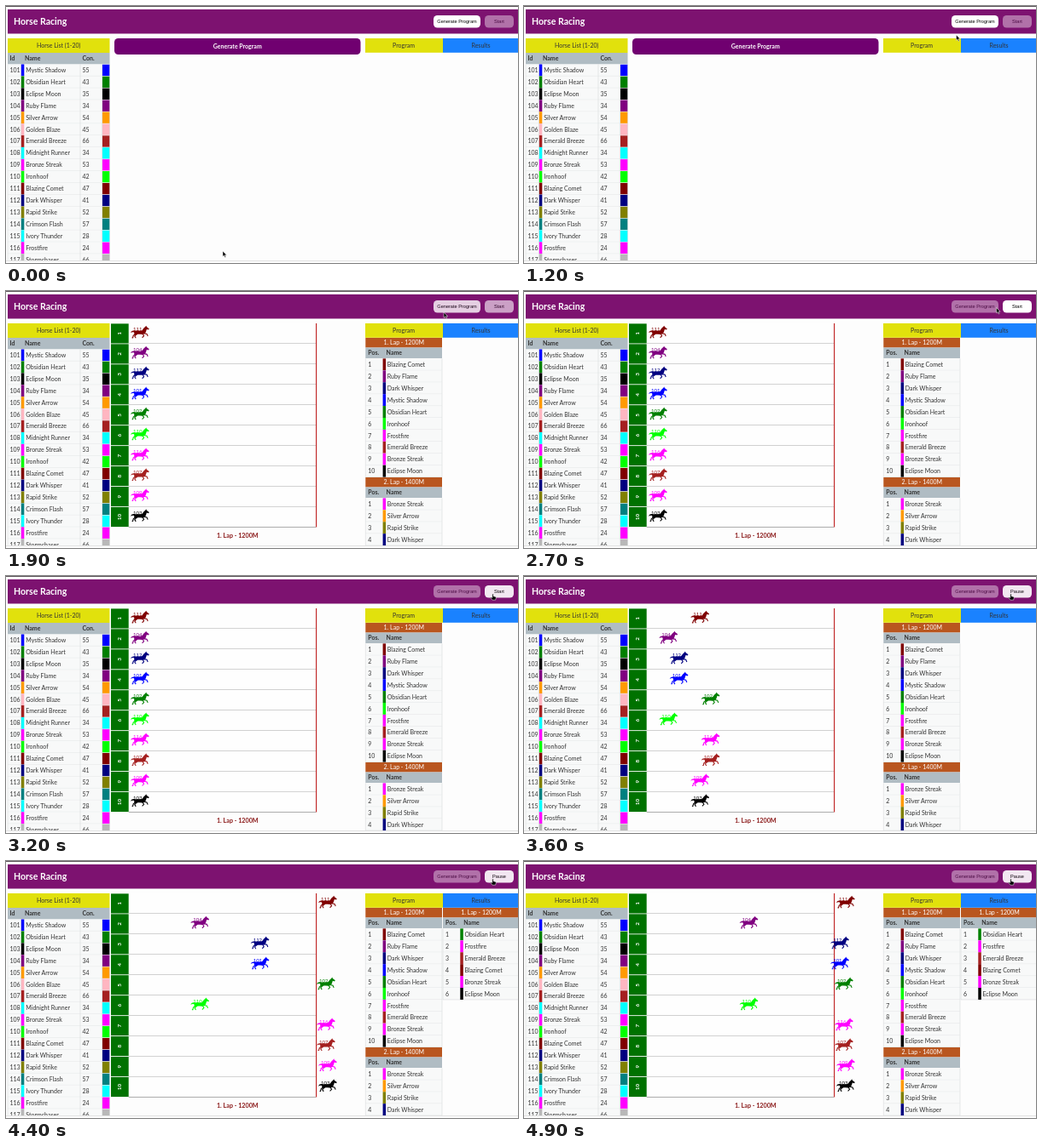
These frames come from a looping animation (600 px wide and 302 px high, 5000 ms). An HTML page:

```html
<!DOCTYPE html>
<html lang="en">
<head>
<meta charset="utf-8">
<title>Horse Racing</title>
<style>
  html, body { margin: 0; width: 100%; height: 100%; overflow: hidden; background: #fdfdfd; }
  svg { display: block; width: 100%; height: 100%; }
  text { font-family: Lato, "Open Sans", sans-serif; font-size: 7px; fill: #333; }
  .bold { font-weight: bold; }
  .mid { text-anchor: middle; }
  .white { fill: #fff; }
  .button text { font-family: "Liberation Sans", Arial, sans-serif; font-size: 5.6px; fill: #000; }
</style>
</head>
<body>
<svg id="stage" viewBox="0 0 600 302"></svg>
<script>
const LOOP = 5000, STEP = 100;
const PROGRAM_AT = 1800, PAUSE_AT = 3400, RACE_AT = 3430;
const ROW = 13.92, LANE = 23.95, TOP = 38;

const HORSES = [
  ['Mystic Shadow', 55, '#0000ff'], ['Obsidian Heart', 43, '#008000'],
  ['Eclipse Moon', 35, '#000000'], ['Ruby Flame', 34, '#800080'],
  ['Silver Arrow', 54, '#ff9a00'], ['Golden Blaze', 45, '#ffb6c1'],
  ['Emerald Breeze', 66, '#a52020'], ['Midnight Runner', 34, '#00ffff'],
  ['Bronze Streak', 53, '#ff00ff'], ['Ironhoof', 42, '#00ff00'],
  ['Blazing Comet', 47, '#800000'], ['Dark Whisper', 41, '#000080'],
  ['Rapid Strike', 52, '#808000'], ['Crimson Flash', 57, '#008080'],
  ['Ivory Thunder', 28, '#00ffff'], ['Frostfire', 24, '#ff00ff'],
  ['Stormchaser', 66, '#b8b8b8']
].map(([name, condition, color], i) => ({ id: 101 + i, name, condition, color }));
const horse = id => HORSES[id - 101];

const LAP_1 = [111, 104, 112, 101, 102, 110, 116, 107, 109, 103];
const LAP_2 = [109, 105, 113, 112];
const FINISHED = [102, 116, 107, 111, 109, 103];
const SPEEDS = [4, 1, 2, 2, 5, 1, 5, 5, 4, 4];
const UNIT = 0.0725; // px per ms
const finishDistance = speed => ({ 5: 218, 4: 220 })[speed] || 216;

// [time, x, y] of the pointer tip
const POINTER = [
  [0, 254, 288], [200, 373, 177], [400, 373, 177], [800, 463, 87], [900, 463, 87],
  [1200, 506.5, 34], [1400, 513, 25], [2100, 513, 25], [2700, 553.5, 19.5],
  [2900, 570.5, 21], [LOOP, 570.5, 21]
];

const rect = (x, y, w, h, fill, extra = '') =>
  `<rect x="${x}" y="${y}" width="${w}" height="${h}" fill="${fill}" ${extra}/>`;
const label = (x, y, str, cls = '', extra = '') =>
  `<text x="${x}" y="${y}" class="${cls}" ${extra}>${str}</text>`;
const line = (x1, y1, x2, y2, color, width = 0.6) =>
  `<path d="M${x1} ${y1}L${x2} ${y2}" stroke="${color}" stroke-width="${width}"/>`;

function button(id, x, w, str) {
  return `<g id="${id}" class="button">${rect(x, 11, w, 14.5, '#fff', 'rx="4.5"')}` +
    label(x + w / 2, 20.2, str, 'mid') + '</g>';
}

function horseList() {
  let out = rect(2, 38, 119.5, 17, '#e1e10c') + label(61.7, 48.6, 'Horse List (1-20)', 'mid') +
    rect(2, 55, 119.5, 13.5, '#b0bcc3') +
    label(4.5, 64.2, 'Id', 'bold') + label(22, 64.2, 'Name', 'bold') + label(89.5, 64.2, 'Con.', 'bold');
  HORSES.forEach((h, i) => {
    const y = 68.5 + i * ROW;
    out += rect(2, y, 119.5, ROW, '#f8f9f9') + line(2, y + ROW, 121.5, y + ROW, '#d5d8da') +
      rect(17.7, y, 3.6, ROW, h.color) + rect(113, y + 0.3, 8.5, ROW - 0.6, h.color) +
      label(4.5, y + 9.4, h.id) + label(23.3, y + 9.4, h.name) + label(89.5, y + 9.4, h.condition);
  });
  for (const x of [2, 17.5, 87, 112.5, 121.5]) out += line(x, 68.5, x, 300, '#d0d4d6', 0.5);
  return out;
}

function lapTable(x, y, title, ids) {
  let out = rect(x, y, 89.7, 11.5, '#b9561f') + label(x + 45, y + 8.2, title, 'mid white') +
    rect(x, y + 11.5, 89.7, 12.6, '#b0bcc3') +
    label(x + 3, y + 20.2, 'Pos.', 'bold') + label(x + 24.3, y + 20.2, 'Name', 'bold');
  ids.forEach((id, i) => {
    const h = horse(id), rowY = y + 24.4 + i * ROW;
    out += `<g class="row">${rect(x, rowY, 89.7, ROW, '#f8f9f9')}` +
      line(x, rowY + ROW, x + 89.7, rowY + ROW, '#d5d8da') +
      line(x, rowY, x, rowY + ROW, '#d0d4d6', 0.5) +
      line(x + 89.7, rowY, x + 89.7, rowY + ROW, '#d0d4d6', 0.5) +
      rect(x + 20.3, rowY, 3.5, ROW, h.color) +
      label(x + 3, rowY + 9.6, i + 1) + label(x + 25.5, rowY + 9.6, h.name) + '</g>';
  });
  return out;
}

function runner(id) {
  const { color } = horse(id);
  return `<g class="runner" fill="${color}" stroke="${color}">
    <path stroke="none" d="M0 8.4C1 5.8 3.4 5.4 5.4 6.2C8 5.4 11 6.6 13.3 5.7C14.6 4.6 15.4 2.4 17.2 1.4L18.3 0L18.8 1.4L21.8 3.7L21 4.9L18.9 4.3C18.3 6 18 8.3 16.4 9.6C14 10.8 11 9.9 8.4 10.1C7.2 11 5.6 11.2 4.4 10.7L4.2 8C3 7 1.6 7.6 0 8.4Z"/>
    <path fill="none" stroke-width="1.1" d="M5.8 9.8L3.2 11.6L2.6 14.2H1.6M7 10L4.8 12.4L6.2 14.6M15.6 9L19 9.7L20.2 12.4M14 9.6L15.6 12L13.6 14.2"/>
    <text x="3" y="6.3" stroke="none" style="font-size:6px;fill:${color}">${id}</text></g>`;
}

function track() {
  let lanes = '';
  LAP_1.forEach((id, i) => {
    const y = TOP + i * LANE, mid = y + LANE / 2;
    lanes += rect(123, y, 240, LANE, '#fefefe') + rect(123, y + 0.4, 20.7, LANE - 0.8, '#007200') +
      line(143.7, y + LANE, 363, y + LANE, '#8a8a8a', 0.7) +
      label(0, 0, i + 1, 'mid bold white', `transform="translate(135.2 ${mid}) rotate(-90)" style="font-size:6.4px"`);
  });
  return lanes + rect(363, TOP, 1.2, LANE * 10, '#c22a2a') + LAP_1.map(runner).join('') +
    label(271.3, 289.8, '1. Lap - 1200M', 'mid bold', 'style="fill:#8b1a1a;font-size:7.2px"');
}

const byId = id => document.getElementById(id);
byId('stage').innerHTML =
  rect(0, 0, 600, 302, '#fdfdfd') + rect(0, 0, 600, 1, '#5a5256') +
  rect(2, 4, 598, 28.5, '#7d1270') +
  label(9, 22, 'Horse Racing', 'bold white', 'style="font-size:10.6px"') +
  button('generate', 501, 55, 'Generate Program') + button('start', 561, 34, 'Start') +
  horseList() +
  `<g id="empty">${rect(127, 38, 288.5, 19, '#700070', 'rx="4.5"')}` +
    label(271.3, 50, 'Generate Program', 'mid bold white') + '</g>' +
  rect(421, 38, 91, 16.8, '#e1e10c') + label(466, 48.6, 'Program', 'mid') +
  rect(512, 38, 88, 16.8, '#1a82ff') + label(556.5, 48.6, 'Results', 'mid') +
  `<g id="race">${track()}${lapTable(421.3, 55, '1. Lap - 1200M', LAP_1)}` +
    lapTable(421.3, 219, '2. Lap - 1400M', LAP_2) + '</g>' +
  `<g id="results">${lapTable(512, 55, '1. Lap - 1200M', FINISHED)}</g>` +
  rect(0, 299, 600, 3, '#fcfcfc') + line(0, 299.5, 600, 299.5, '#dcdcdc', 0.8) +
  `<path id="arrow" d="M0 0V6.4L1.5 5.1L2.6 7.5L3.7 7L2.6 4.7H4.6Z" fill="#000" stroke="#fff" stroke-width=".5"/>
   <path id="hand" d="M-.7 .6Q0-.4 .7 .6V2.7L3.4 3.4Q4 3.8 3.8 4.6L3.1 7.2H-.6L-2.6 4.5Q-2.4 3.5-.7 4.5Z" fill="#000" stroke="#fff" stroke-width=".5"/>`;

const runners = [...document.querySelectorAll('.runner')];
const resultRows = [...document.querySelectorAll('#results .row')];
const startText = document.querySelector('#start text');
const show = (node, on) => { node.style.display = on ? '' : 'none'; };
const clamp = v => Math.max(0, Math.min(1, v));

function pointerAt(t) {
  const i = POINTER.findIndex(p => p[0] > t);
  const [t0, x0, y0] = POINTER[i - 1], [t1, x1, y1] = POINTER[i];
  const k = (t - t0) / (t1 - t0);
  return [x0 + (x1 - x0) * k, y0 + (y1 - y0) * k];
}

function draw(t) {
  const generated = t >= PROGRAM_AT;
  const fade = clamp((t - PROGRAM_AT + 50) / 450);
  show(byId('empty'), !generated);
  show(byId('race'), generated);
  byId('generate').style.opacity = generated ? 1 - 0.6 * fade : 1;
  byId('start').style.opacity = t >= 2900 ? 0.9 : generated ? 0.4 + 0.6 * fade : 0.4;
  startText.textContent = t >= PAUSE_AT ? 'Pause' : 'Start';

  const elapsed = Math.max(0, t - RACE_AT);
  const done = {};
  runners.forEach((node, i) => {
    const run = SPEEDS[i] * UNIT * elapsed, end = finishDistance(SPEEDS[i]);
    done[LAP_1[i]] = run >= end;
    node.setAttribute('transform', `translate(${146 + Math.min(run, end)} ${TOP + 2.7 + i * LANE})`);
  });
  resultRows.forEach((row, i) => show(row, done[FINISHED[i]]));
  show(byId('results'), done[FINISHED[0]]);

  const [x, y] = pointerAt(t);
  const clickable = t >= 2900 || (t >= 1400 && !generated);
  show(byId('arrow'), !clickable);
  show(byId('hand'), clickable);
  byId(clickable ? 'hand' : 'arrow').setAttribute('transform', `translate(${x} ${y})`);
}

const began = performance.now();
function tick() {
  const t = (performance.now() - began + 5) % LOOP;
  draw(Math.floor(t / STEP) * STEP);
  requestAnimationFrame(tick);
}
tick();
</script>
</body>
</html>
```
